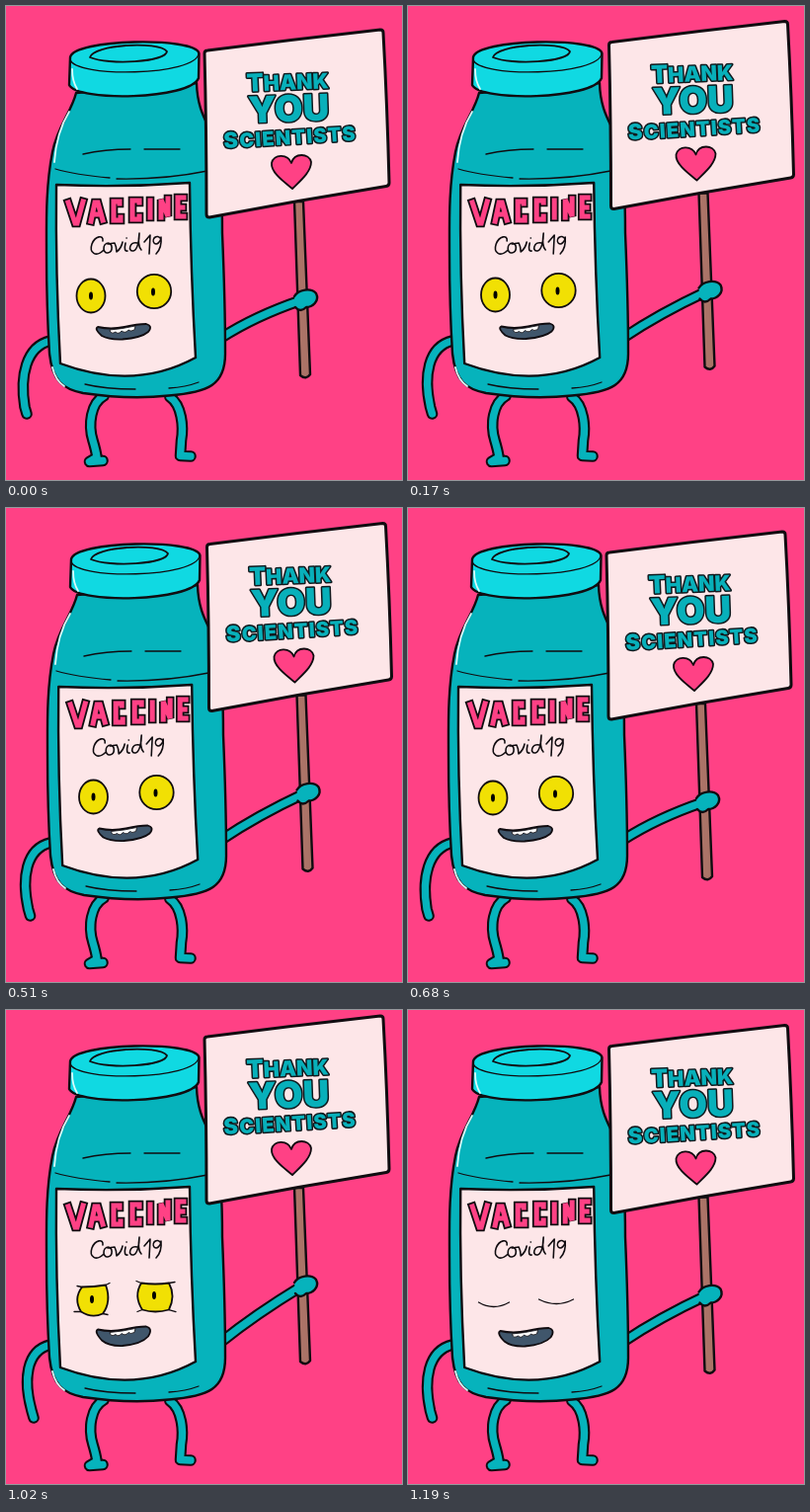
An HTML page for the animation above (1.36 s loop, 401 by 480 pixels).

```html
<!DOCTYPE html>
<html lang="en">
<head>
<meta charset="utf-8">
<style>
  html, body { margin: 0; height: 100%; overflow: hidden; background: #ff4185; }
  svg { display: block; width: 401px; height: 480px; }
  .ink { stroke: #100c10; stroke-width: 2.4; stroke-linecap: round; stroke-linejoin: round; }
  .thin { stroke-width: 1.8; }
  .line { fill: none; stroke-width: 1.3; }
  .shine { fill: none; stroke: #d9fbfa; stroke-width: 1.8; stroke-linecap: round; }
  .limb path { fill: none; stroke: #100c10; stroke-width: 11.6; stroke-linecap: round; stroke-linejoin: round; }
  .limb path + path { stroke: #06b3bc; stroke-width: 7.4; }
  .teal { fill: #06b3bc; }
  .aqua { fill: #10d9e2; }
  .paper { fill: #fde6e8; }
  .pink { fill: #ff4185; }
  .yellow { fill: #f1e004; }
  .title path { fill: none; stroke: #100c10; stroke-width: 8.6; stroke-linecap: square; stroke-miterlimit: 1.6; }
  .title path + path { stroke: #ff4185; stroke-width: 5; }
  .words text { font-family: Inter, Lato, sans-serif; font-weight: 900; text-anchor: middle; fill: #08b0ba;
    stroke: #101a1e; stroke-width: 3; stroke-linejoin: round; paint-order: stroke; }
</style>
</head>
<body>
<svg viewBox="0 0 401 480">
  <rect width="401" height="480" class="pink"/>
  <g class="limb" id="leftArm"></g>
  <g class="limb" id="leftLeg"></g>
  <g class="limb" id="rightLeg"></g>
  <g class="limb" id="rightArm"></g>

  <g id="bottle">
    <path class="ink teal" d="M71 88 C66 108 52 122 47 148 C40 184 41 218 41 250 Q41 305 44 352 C47 380 58 388 78 392 Q125 399 165 394.5 C205 391 222 384 222 352 Q222 300 219 230 Q219 170 213 143 C208 121 194 112 193 78Z"/>
    <path class="ink line" d="M78 150 Q100 145 126 145 M140 145 H176 M50 165 Q70 171 105 174 M112 175 Q160 176 204 167 M80 383 Q100 388 131 388 M165 387 Q182 386 195 381"/>
    <path class="shine" d="M64 107 Q51 128 49 158 M47 366 Q50 379 59 385"/>
    <path class="ink aqua" d="M65 52 L64 80 C72 97 186 95 195 73 L195.5 48 C192 31 68 33 65 52Z"/>
    <path class="ink line" d="M65 54 C69 73 193 71 195 48"/>
    <path class="shine" d="M67 64 Q67 76 72 84"/>
    <path class="ink thin aqua" d="M85 52 C88 39 154 35 163 46 C161 57 104 60 85 52Z"/>
  </g>

  <g id="label">
    <path class="ink paper" d="M51 181 Q118 184 186 179 Q187 270 192 356 Q130 390 55 362 Q50 270 51 181Z"/>
    <g class="title" id="title"></g>
    <path class="ink line" style="stroke-width:1.6px" d="M98 238 C99 231 90 233 87 241 C84 250 91 255 99 247
      M104 240 C97 240 98 251 103 250 C109 249 108 239 103 241 L110 240 Q112 244 112 249 Q117 245 118 239
      M121 240 Q119 249 123 248 M122 235 h.2
      M133 240 C125 238 123 249 129 248 C133 247 135 238 135 230 Q133 243 137 247
      M140 239 L146 232 L145 251 M157 236 C153 230 147 236 150 240 C153 243 157 238 157 234 Q158 245 152 251"/>
  </g>

  <g id="eyes">
    <g id="openEyes">
      <ellipse class="ink thin yellow" cx="86" cy="293.5" rx="14.5" ry="17"/>
      <ellipse class="ink thin yellow" cx="150" cy="289" rx="17.2" ry="17.2"/>
    </g>
    <g id="squint">
      <path class="ink thin yellow" d="M76 281 Q88 281 100 279 Q106 296 97 308 Q86 313 75 306 Q67 293 76 281Z
        M136 277 Q150 279 164 277 Q171 290 164 304 Q150 308 137 304 Q128 290 136 277Z"/>
      <path class="ink line" d="M71 280 L76 281 M100 279 L104 277 M131 275 L136 277 M164 277 L170 276
        M68 306 L75 306 M97 308 L102 309 M132 306 L137 304 M164 304 L171 306"/>
    </g>
    <g id="pupils">
      <ellipse cx="86" cy="293.5" rx="2" ry="4"/>
      <ellipse cx="149" cy="289.5" rx="2" ry="4"/>
    </g>
    <path class="ink line" id="closedEyes" d="M69 297 Q84 306 100 297 M130 294 Q148 303 165 294"/>
  </g>
  <g id="mouth">
    <path class="ink thin" id="lips" fill="#40566b"/>
    <path fill="#fff" stroke="#100c10" stroke-width=".8" d="M105 328 Q118 327 131 324 L130 328 Q126 330 124 328 Q121 332 117 329 Q114 333 111 330 Q106 333 105 328Z"/>
  </g>

  <g id="sign">
    <path class="ink" fill="#ab7367" d="M292 198 L301 198 L308 373 Q304 379 298 374Z"/>
    <path class="ink paper" style="stroke-width:3px" d="M204 45 Q290 34 379 24 Q382 24 382 27 Q386 100 388 179 Q388 182 385 182.5 Q295 197 206 214 Q203 214 203 211 Q203 125 201 48 Q201 45 204 45Z"/>
    <g class="words">
      <text transform="translate(285.5 85) rotate(-2.5)" font-size="21.5"><tspan font-size="25">T</tspan>HANK</text>
      <text transform="translate(286.5 117) rotate(-2)" font-size="37">YOU</text>
      <text transform="translate(288 140) rotate(-3.5)" font-size="20" letter-spacing="1.2"><tspan font-size="22">S</tspan>CIENTISTS</text>
    </g>
    <path class="ink thin pink" d="M290 185 C280 177 268 168 269 159 C271 150 285 149 289 159 C292 148 307 149 309 158 C309 168 298 177 290 185Z"/>
  </g>
  <path class="ink teal" id="hand" d="M292 294 C296 287 309 285 314 291 C318 299 310 305 304 305 Q298 311 293 305"/>
</svg>
<script>
const $ = id => document.getElementById(id);
const STEP = 170;

// Each shape is stroked twice: a wide dark line, then a narrower coloured one.
function outlined(id, d) {
  const g = $(id);
  while (g.children.length < 2)
    g.append(document.createElementNS('http://www.w3.org/2000/svg', 'path'));
  for (const path of g.children) path.setAttribute('d', d);
}
const move = (id, [x, y]) => $(id).setAttribute('transform', `translate(${x} ${y})`);
const show = (id, on) => $(id).style.display = on ? '' : 'none';

outlined('leftLeg', 'M99 395 C86 402 83 424 88 440 Q91 450 92 457 L84.5 461.5 L98 460.5');
outlined('rightLeg', 'M166 396 C178 404 180 426 177.5 440 L176.5 455.5 L187 456');
outlined('title', `M63 199 L70 220 H72 L78 198 M86 218 L90 199 H93 L98 217 M89 211 H95
  M115 200 V198 H109 V217 H116 V214 M135 199 V197 H128 V216 H135 V213
  M146 197 V214 M157 214 V196 L164 213 V195 M180 194 H174 V213 H180 M174 204 H179`);

const down = { sign: [0, 0], body: [0, 0], face: [0, 0], eyes: [0, 0], mouth: [0, 0], left: 20, jaw: 0 };
const mid = { sign: [2.5, -8.5], body: [1, 0], face: [2.2, 0], eyes: [2.5, -1], mouth: [1.5, -.5], left: 23.5, jaw: 0 };
const up = { sign: [0, -18], body: [0, 0], face: [0, 0], eyes: [1, -.5], mouth: [0, -1.5], left: 27, jaw: 4 };
const poses = [down, mid, up, mid];

function draw(step) {
  const p = poses[step % 4], squint = step === 6, closed = step === 7;
  const [sx, sy] = p.sign, hx = p.left, jaw = closed ? 3 : p.jaw;
  move('sign', p.sign);
  move('hand', p.sign);
  move('bottle', p.body);
  move('label', p.face);
  move('eyes', p.eyes);
  move('mouth', closed ? [.5, 0] : p.mouth);
  outlined('rightArm', `M218 336 Q${252 + sx} ${314 + sy * .3} ${299 + sx} ${298 + sy}`);
  outlined('leftArm', `M45 339 C20 345 ${hx / 2 + 4} 375 ${hx - 1} 406 l2 7`);
  $('lips').setAttribute('d', `M93 325 Q106 328 120 325 Q133 322 142 322 Q149 324 144 ${330 + jaw / 2}
    Q137 ${336 + jaw} 118 ${337.5 + jaw} Q104 ${338 + jaw} 97 ${334 + jaw / 2} Q89 327 93 325Z`);
  show('openEyes', !squint && !closed);
  show('squint', squint);
  show('pupils', !closed);
  show('closedEyes', closed);
}

function tick() {
  draw(Math.floor(performance.now() / STEP) % 8);
  requestAnimationFrame(tick);
}
tick();
</script>
</body>
</html>
```
